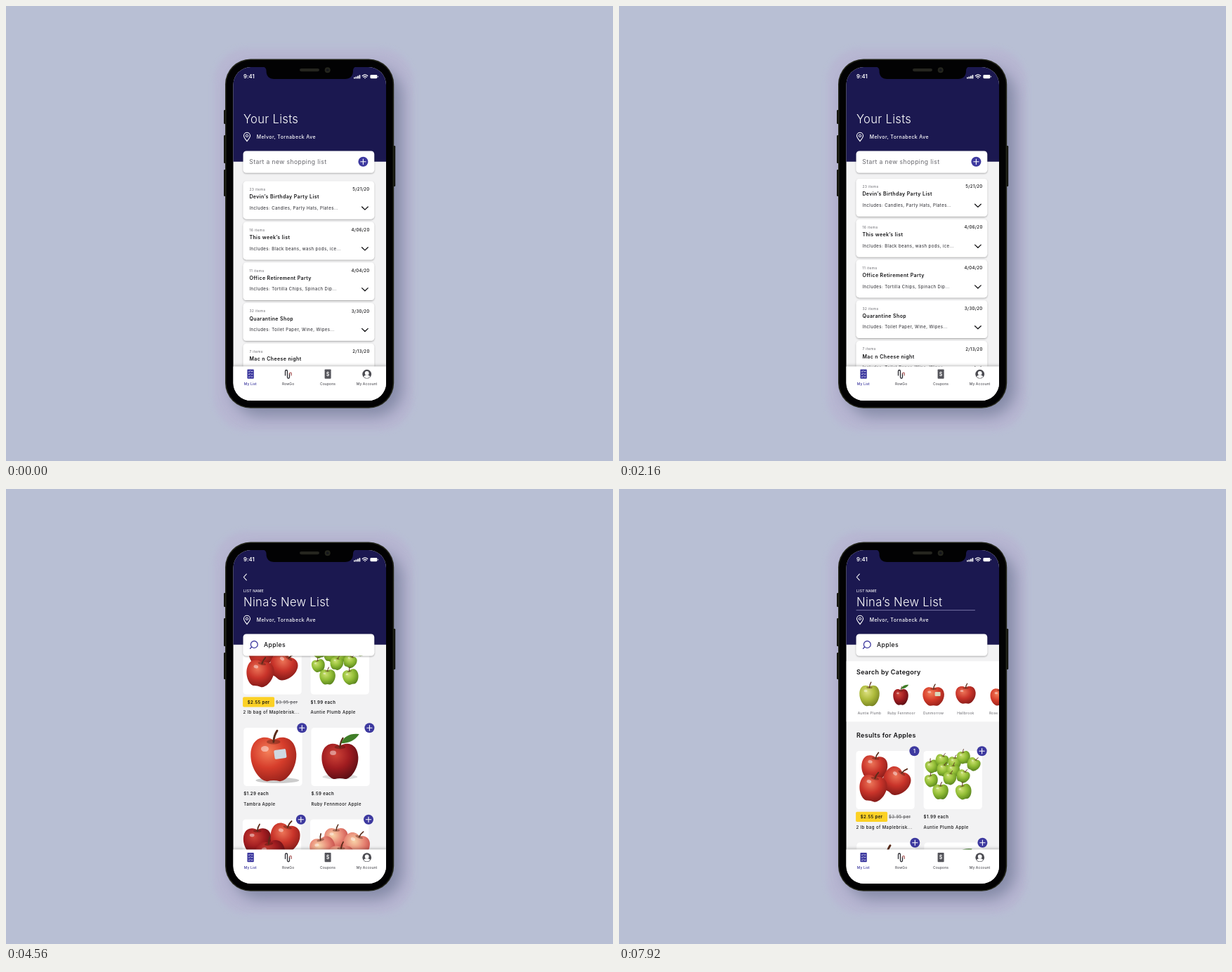
Recreate the animation shown at these times as an HTML page. Size 864 by 648 pixels, loop 8 s.

```html
<!DOCTYPE html>
<html lang="en">
<head>
<meta charset="utf-8">
<title>Shopping list app</title>
<style>
html, body { margin: 0; width: 100%; height: 100%; overflow: hidden; background: #b8bfd4; }
svg { display: block; width: 100vw; height: 100vh; }
text { font-family: Inter, Roboto, sans-serif; white-space: pre; }
</style>
</head>
<body>
<svg id="stage" viewBox="0 0 864 648" xmlns="http://www.w3.org/2000/svg"></svg>
<script>
const NAVY = '#1b1850', BLUE = '#3d399f', INK = '#121214', GREY = '#66666c', YELLOW = '#fcd125';
const LOOP = 8000, STEP = 80;

// ---------- drawing helpers ----------
const text = (x, y, s, size, o = {}) =>
  `<text x="${x}" y="${y}" font-size="${size}" font-weight="${o.w || 400}" fill="${o.c || INK}" ` +
  `letter-spacing="${o.ls ?? 0.4}" text-anchor="${o.a || 'start'}" ${o.x || ''}>${s}</text>`;
const rect = (x, y, w, h, r, fill, x2 = '') =>
  `<rect x="${x}" y="${y}" width="${w}" height="${h}" rx="${r}" fill="${fill}" ${x2}/>`;
const line = (d, c, w, x = '') =>
  `<path d="${d}" fill="none" stroke="${c}" stroke-width="${w}" stroke-linecap="round" stroke-linejoin="round" ${x}/>`;
const shape = (d, fill, x = '') => `<path d="${d}" fill="${fill}" ${x}/>`;
const disc = (x, y, r, fill, x2 = '') => `<circle cx="${x}" cy="${y}" r="${r}" fill="${fill}" ${x2}/>`;
const at = (x, y, s) => `<g transform="translate(${x} ${y})">${s}</g>`;
const group = (id, s, x = '') => `<g id="${id}" ${x}>${s}</g>`;

const plus = (x, y, r = 7) => disc(x, y, r, BLUE) +
  line(`M${x - r * .52} ${y}h${r * 1.04}M${x} ${y - r * .52}v${r * 1.04}`, '#fff', 1.1);

const APPLE = 'M0-.78C.25-1 .95-1.02 1-.2C1.02.45 .55 1 .27.97Q0 .9-.27.97C-.55 1-1.02.45-1-.2C-.95-1.02-.25-1 0-.78Z';
function apple(x, y, r, tone, o = {}) {
  const k = o.k || 1;
  return `<g transform="translate(${x} ${y}) rotate(${o.turn || 0}) scale(${r} ${r * k})">` +
    shape(APPLE, `url(#${tone})`) +
    '<ellipse cx="0" cy="-.72" rx=".3" ry=".1" fill="#3a1008" opacity=".35"/>' +
    line('M0-.72Q.02-1 .16-1.2', '#5a2c1a', .09) +
    (o.leaf ? shape('M.05-.92Q.3-1.5 1.05-1.42Q.75-.95.05-.92Z', '#3f7d27') : '') +
    '<ellipse cx="-.38" cy="-.42" rx=".17" ry=".12" fill="#fff" opacity=".45"/></g>';
}
const trio = tone => apple(26, 24, 18.5, tone, { turn: 8 }) + apple(57, 43, 19.5, tone, { turn: 35 }) +
  apple(24, 53, 19.5, tone, { turn: 12 });

const gradient = (id, a, b, c) => `<radialGradient id="${id}" cx=".38" cy=".32" r=".75">` +
  `<stop offset="0" stop-color="${a}"/><stop offset=".5" stop-color="${b}"/><stop offset="1" stop-color="${c}"/></radialGradient>`;
const blur = (id, s) => `<filter id="${id}" x="-30%" y="-30%" width="160%" height="160%"><feGaussianBlur stdDeviation="${s}"/></filter>`;

const defs = '<defs>' +
  gradient('red', '#ec7558', '#c9342a', '#811917') +
  gradient('scarlet', '#f4805a', '#d63d2b', '#95201a') +
  gradient('dark', '#cf4438', '#a01c20', '#560d13') +
  gradient('green', '#cbe070', '#91bd35', '#547f1b') +
  gradient('lime', '#dde080', '#aebb3c', '#737f20') +
  gradient('pink', '#f8d3a8', '#e78574', '#bd403f') +
  blur('soft', 10) + blur('halo', 4) +
  '<filter id="lift" x="-10%" y="-20%" width="120%" height="150%"><feDropShadow dx="0" dy="1" stdDeviation="1" flood-color="#000" flood-opacity=".35"/></filter>' +
  '<filter id="rise" x="-10%" y="-20%" width="120%" height="130%"><feDropShadow dx="0" dy="-1" stdDeviation="2.2" flood-color="#000" flood-opacity=".3"/></filter>' +
  '<clipPath id="screen"><rect x="323.5" y="87" width="217.5" height="475" rx="25"/></clipPath>' +
  '<clipPath id="body"><rect x="323.5" y="221.5" width="217.5" height="341"/></clipPath></defs>';

// ---------- phone ----------
function phoneBack() {
  const button = (x, y, h) => rect(x, y, 4, h, 1.2, '#15160f');
  return rect(296, 60, 284, 545, 48, '#b7b5d2', 'filter="url(#halo)" opacity=".8"') +
    rect(322, 88, 242, 496, 40, '#737b98', 'filter="url(#soft)" opacity=".75"') +
    button(310, 148, 20) + button(310, 184, 40) + button(310, 233, 38) + button(550.2, 199, 58) +
    rect(312, 75.5, 240.2, 497.3, 36, '#23251a') + rect(313.6, 77, 237, 494.3, 34.5, '#020203');
}
function phoneFront() {
  return shape('M366 86H498Q494 88 494 92Q494 104 482 104H382Q370.5 104 370.5 92Q370.5 88 366 86Z', '#020203') +
    rect(418, 89, 28, 4.2, 2.1, '#25251f') + disc(457.7, 91.2, 4, '#24251d') + disc(457.7, 91.2, 1.8, '#15161c');
}
function statusBar() {
  const bars = [0, 1, 2, 3].map(i => rect(495 + i * 2.5, 101.6 - i * 1.1, 1.8, 1.8 + i * 1.1, .4, '#fff')).join('');
  return text(338, 103.4, '9:41', 7.7, { w: 600, c: '#fff', ls: .1 }) + bars +
    line('M507.3 99.5Q511 96.3 514.7 99.5M508.9 101.3Q511 99.6 513.1 101.3', '#fff', 1.2) + disc(511, 102.8, .8, '#fff') +
    rect(518.4, 98, 10, 5.2, 1.4, '#fff') + rect(529.2, 99.7, .9, 1.8, .4, '#fff');
}

// ---------- shared header and navigation ----------
const title = (id, s, c) => text(338, 166.8, s, 16.6, { w: 300, c, ls: .3, x: `id="${id}"` });
function header() {
  return rect(323, 86, 219, 135.7, 0, NAVY) + statusBar() + title('title', '', '#fff') +
    group('edit', line('M342.3 121.2L338.3 125.5L342.3 129.8', '#fff', 1.1) +
      text(338, 147.4, 'LIST NAME', 4.9, { w: 500, c: '#fff', ls: .3 })) +
    line('M338 172.6H506.5', '#8c8ab8', .8, 'id="underline"') +
    shape('M343 192.6C340.5 189.3 338.5 187.3 338.5 184.8A4.5 4.5 0 0 1 347.5 184.8C347.5 187.3 345.5 189.3 343 192.6Z', 'none', 'stroke="#fff" stroke-width="1.1"') +
    disc(343, 184.8, 1.7, 'none', 'stroke="#fff" stroke-width="1"') +
    text(356.7, 189.3, 'Melvor, Tornabeck Ave', 6.9, { w: 500, c: '#fff', ls: .42 }) +
    rect(337.6, 206.5, 186.6, 31, 4.5, '#fff', 'filter="url(#lift)"') +
    group('startRow', text(346.3, 225.3, 'Start a new shopping list', 8.6, { c: GREY }) + plus(508.4, 221.8)) +
    group('searchRow', disc(353.3, 221.4, 4.9, 'none', `stroke="${BLUE}" stroke-width="1.3"`) +
      line('M349.7 225L347.5 227.3', BLUE, 1.3) + text(367, 225.3, '', 8.6, { x: 'id="query"' }));
}
function navBar() {
  const label = (x, s, c) => text(x, 540, s, 5, { a: 'middle', c, ls: .08, w: 450 });
  const checks = [520.5, 524.2, 528].map(y => line(`M345.2 ${y}l.8.8 1.5-1.7M349 ${y}h2`, '#fff', .7)).join('');
  return rect(323, 513.5, 219, 50, 0, '#fff', 'filter="url(#rise)"') + group('tabs',
    rect(343.4, 517.5, 9.4, 13.2, 1, BLUE) + checks +
    line('M397.5 526V520.3Q397.5 518.5 399 518.5T400.5 520.3V528.5Q400.5 530.3 402 530.3T403.5 528.5V523.5', '#2b2b31', 1.3) +
    line('M403.5 524Q403.5 522 405 522T406.2 523.8V526', '#a34a4a', 1.1) +
    rect(453.6, 517.5, 9, 13.2, .8, '#55555b') + text(458.1, 526.6, '$', 7, { a: 'middle', c: '#fff', w: 600, ls: 0 }) +
    disc(513.7, 524.2, 6.4, '#4b4b51') + disc(513.7, 522.9, 2.9, '#fff') +
    shape('M509 528.1Q510 526 512 525.8H515.4Q517.4 526 518.4 528.1Q513.7 532 509 528.1Z', '#fff') +
    label(347.8, 'My List', BLUE) + label(401.6, 'RowGo', '#55555b') + label(458, 'Coupons', '#55555b') + label(513.6, 'My Account', '#55555b'));
}

// ---------- saved lists ----------
const LISTS = [
  [23, 'Devin’s Birthday Party List', '5/21/20', 'Candles, Party Hats, Plates'],
  [16, 'This week’s list', '4/06/20', 'Black beans, wash pods, ice'],
  [11, 'Office Retirement Party', '4/04/20', 'Tortilla Chips, Spinach Dip'],
  [32, 'Quarantine Shop', '3/30/20', 'Toilet Paper, Wine, Wipes'],
  [7, 'Mac n Cheese night', '2/13/20', 'Toilet Paper, Wine, Wipes'],
  [32, 'After Work Shop', '3/30/20', 'Milk, Bread, Bright Q Fla'],
  [22, 'This week’s List', '3/14/20', 'Milk, Eggs, Bananas'],
];
const listCard = ([n, name, date, items], i) => at(337.6, 249.6 + i * 57.8,
  rect(0, 0, 186.6, 53.8, 4.5, '#fff', 'filter="url(#lift)"') +
  text(8.8, 13.4, n + ' items', 5, { c: GREY, ls: .35 }) + text(180, 13.6, date, 6, { w: 500, a: 'end', ls: .35 }) +
  text(8.8, 24.6, name, 7, { w: 600 }) + text(8.8, 40.2, `Includes: ${items}...`, 6, { ls: .44, c: '#222228' }) +
  line('M169 36.4L173.3 40.5L177.6 36.4', INK, 1.3));

// ---------- product tiles ----------
const sale = (x, y, now, old) => rect(x, y, 45, 14.4, 1.8, YELLOW) +
  text(x + 22.5, y + 9.4, now, 6, { w: 600, a: 'middle' }) +
  (old ? text(x + 47, y + 9.4, old, 6, { c: '#4c4c50', x: 'text-decoration="line-through"' }) : '');
const tile = (x, y, art, price, name, badge) => at(x, y, rect(0, 0, 83.3, 83, 4.5, '#fff') + art +
  (price[1] ? sale(-.3, 86.7, ...price) : text(0, 96.2, price[0], 6, { w: 600 })) +
  text(0, 110.6, name, 6, { w: 500, ls: .43 }) + (badge || plus(83, .3)));

function burgerBox() {
  return shape('M0 22L83 14L82.5 59L1.5 67Z', '#b3271f') + shape('M0 22L83 14V18.5L0 26.5Z', '#6fa03c') +
    shape('M73 17L82 16V36L73 37Z', '#7fae42') +
    text(45, 29, 'THE ORIGINAL', 4.8, { a: 'middle', c: '#f3c75a', w: 600, x: 'transform="rotate(-4 45 29)"' }) +
    shape('M15 33L73 28.5V43L15 47.5Z', '#fff') +
    shape('M28 53Q31 43 47 43T64 51Z', '#d58a3c') + line('M28 54Q46 50 65 53', '#72a53a', 2.5) +
    line('M29 57Q46 54 64 56', '#6d331b', 3) + shape('M29 59H64Q62 62.5 50 63T29 59Z', '#dca253') +
    line('M6 58L22 56.5', '#e3b45c', 2);
}
function cheeseBag() {
  return shape('M23 13Q41 10 60 13L59 70Q41 73 24 70Z', '#a8242c') + shape('M27 35H56L57 57H26Z', '#ecd9bd') +
    [0, 1, 2, 3, 4, 5].map(i => line(`M${28 + i * 4.7} ${40 + i % 3 * 4}l4 5`, '#c9ab84', 1)).join('') +
    shape('M24 56Q41 52 59 56L59 70Q41 73 24 70Z', '#26294f') + disc(41.5, 24, 5, '#bb2630') +
    rect(29, 31, 25, 4, 1, '#f1e6df') + rect(31, 45, 21, 4, 1, '#c43a33') + line('M29 62H54M33 66H50', '#c3c6dc', .7);
}
function teaBottle() {
  return shape('M34 9H51V16Q57 24 57 32V78Q57 81 53 81H32Q28 81 28 78V32Q28 24 34 16Z', '#c87b27') +
    shape('M32 27Q35 18 37 17V78H32Z', '#e6a650', 'opacity=".7"') + rect(33.5, 4, 18, 8, 1.5, '#e5e5e5') +
    rect(28, 32, 29, 39, .5, '#f4f2ed') + text(42.5, 43, 'KOMBUCHA', 4.8, { a: 'middle', w: 700, c: '#303b7c', ls: 0 }) +
    rect(33, 47, 19, 11, 1, '#3e3d92') + disc(42.5, 35.5, 2.2, '#d9a94b') + line('M32 63H53M35 66H50', '#8d8fa5', .7);
}
function juiceJug() {
  return shape('M26 7H46Q48 15 57 20Q68 25 69 39V75Q69 82 62 82H27Q20 82 20 76V34Q20 23 25 16Z', '#9c2a14') +
    shape('M22 36Q26 21 30 17L31 79H25Q22 79 22 74Z', '#c44a22', 'opacity=".7"') +
    line('M54 25Q63 29 62 40V49Q57 49 56 43Z', '#dcc2b8', 2.5) + rect(25, 1, 20, 7, 1.5, '#241a1c') +
    rect(34, 50, 34, 26, 1, '#cb3b20') + rect(38, 53, 17, 12, 1, '#f2d5a3') +
    line('M38 69H63M38 72.5H57', '#f0a24c', 1.4);
}
const common = text(338, 260.4, 'Commonly Added Items', 9, { w: 600, ls: .3 }) +
  tile(337.4, 279, burgerBox(), ['$2.99 each'], 'Fenn Burgers') +
  tile(433.6, 279, cheeseBag(), ['$2.55 each', '$3.95 each'], 'Nut Cheese Mozzarell...') +
  tile(338.3, 409.4, teaBottle(), ['$3.99 each'], 'Ginger Tea') +
  tile(434.4, 409.4, juiceJug(), ['$8.99 each'], 'Hot Sauce');

// ---------- search results ----------
const GREENS = [[12, 22], [26, 14], [44, 17], [57, 9], [71, 19], [28, 27], [42, 28], [11, 42], [56, 36], [37, 39], [24, 58], [57, 58]];
const greenPile = GREENS.map(([x, y], i) => apple(x, y, i > 9 ? 11.3 : 9.4, 'green', { turn: i * 37 % 50 - 20 })).join('');
const CATEGORIES = [
  [356.5, 'Auntie Plumb', apple(0, 0, 14.3, 'lime', { k: 1.1 })],
  [402, 'Ruby Fennmoor', apple(-1, 2, 10.8, 'dark', { k: 1.12, leaf: 1 })],
  [447.6, 'Dunmorrow', apple(0, 1, 15.3, 'scarlet', { k: .92 }) + rect(2, -5, 8, 6, 1, '#d9d8bc')],
  [493.4, 'Hallbrook', apple(0, -1, 14.3, 'red', { k: .92 })],
  [541, 'Rose Dawn', apple(1, 2, 13.5, 'scarlet', { k: .95 })],
];
const firstBadge = group('addOne', plus(83, .3)) +
  group('added', disc(83, .3, 7, BLUE) + text(83, 3.3, '1', 8, { a: 'middle', c: '#fff', w: 500, ls: 0 }));
const bigApple = '<ellipse cx="48" cy="75" rx="31" ry="4" fill="#ccc"/>' + apple(42.5, 44, 32.5, 'scarlet', { k: 1.02 }) +
  rect(43.5, 31, 17, 13, 2, '#cfd8e2', 'transform="rotate(-8 52 37)"');
const leafApple = '<ellipse cx="41" cy="70" rx="25" ry="3.5" fill="#ddd"/>' + apple(41, 47, 26, 'dark', { k: 1.03, leaf: 1 });
const redPile = apple(21, 31, 20, 'dark') + apple(60, 26, 21, 'red', { turn: 15 }) + apple(40, 50, 21, 'dark', { turn: -10 });
const pinkPile = apple(37, 28, 17, 'pink') + apple(65, 38, 19, 'pink', { turn: 20 }) + apple(18, 42, 18, 'pink', { turn: -15 }) + apple(44, 55, 19, 'pink');
const results = rect(323, 245.3, 219, 86, 0, '#fff') +
  text(338, 264.4, 'Search by Category', 9, { w: 600, ls: .3 }) +
  CATEGORIES.map(([x, s, art]) => at(x, 294, art) + text(x, 321, s, 4.9, { a: 'middle', c: GREY, ls: .25 })).join('') +
  text(338, 354.4, 'Results for Apples', 9, { w: 600, ls: .3 }) +
  tile(337.4, 373, trio('red'), ['$2.55 per', '$3.95 per'], '2 lb bag of Maplebrisk...', firstBadge) +
  tile(433.6, 373, greenPile, ['$1.99 each'], 'Auntie Plumb Apple') +
  tile(338.3, 503.5, bigApple, ['$1.29 each'], 'Tambra Apple') +
  tile(434.4, 503.5, leafApple, ['$.59 each'], 'Ruby Fennmoor Apple') +
  tile(336.8, 634, redPile, ['$1.49 each'], 'Red Apple') +
  tile(433, 634, pinkPile, ['$1.79 each'], 'Pink Apple');

// ---------- quantity sheet ----------
const sheet = rect(323.5, 418, 217.5, 190, 13, '#fff', 'filter="url(#rise)"') +
  line('M396.3 428.4H465.5', '#0d0d10', 2.6) +
  `<g transform="translate(345 437) scale(.62)">${trio('red')}</g>` +
  text(409.6, 445.7, '2 lb bag Maplebrisk', 9, { w: 600, ls: .3 }) + text(409.6, 458, 'Apples', 9, { w: 600, ls: .3 }) +
  sale(409.7, 466.6, '$2.55 ea') + text(459, 475.6, 'Aisle 2', 6, { w: 500 }) +
  rect(341, 496.5, 89.8, 24.8, 1.5, '#fff', `stroke="${BLUE}" stroke-width="1.3"`) +
  disc(353.3, 508.8, 8.6, BLUE) + line('M348.8 508.8H357.8', '#fff', 1.2) + plus(418.2, 508.8, 8.6) +
  text(385.6, 513.6, '0', 13, { a: 'middle', c: '#2c2960', ls: 0, x: 'id="count"' }) +
  rect(443.6, 496, 73.6, 25.5, 2, BLUE) + text(480.3, 512, 'Done', 9.4, { a: 'middle', c: '#fff', w: 500, ls: .3 });

const stage = document.getElementById('stage');
stage.innerHTML = defs + rect(0, 0, 864, 648, 0, '#b8bfd4') + phoneBack() +
  '<g clip-path="url(#screen)">' + rect(323, 86, 219, 477, 0, '#f2f2f3') +
  '<g clip-path="url(#body)">' + group('lists', LISTS.map(listCard).join('')) + group('common', common) + group('results', results) + '</g>' +
  header() + navBar() + group('sheet', sheet) + '</g>' + phoneFront();

// ---------- motion ----------
const el = id => document.getElementById(id);
const ramp = (t, a, b) => Math.min(1, Math.max(0, (t - a) / (b - a)));
const ease = (t, a, b) => { const p = ramp(t, a, b); return p * p * (3 - 2 * p); };
const show = (id, v) => el(id).setAttribute('opacity', Number(v));
const shift = (id, y) => el(id).setAttribute('transform', `translate(0 ${y})`);
const write = (id, s, c) => { el(id).textContent = s; el(id).setAttribute('fill', c); };
const typed = (s, t, a, b) => s.slice(0, Math.round(s.length * ramp(t, a, b)));

function draw(t) {
  const open = ease(t, 2480, 2720), editing = open > .5;
  const found = t >= 4240, picked = t >= 5520;

  shift('lists', -108 * (ease(t, 80, 1280) - ease(t, 1520, 2240)));
  show('lists', 1 - open);
  show('common', found ? 0 : open);
  show('results', found);
  shift('results', (picked ? 0 : 1) - 164.5 * (ease(t, 4240, 4560) - ease(t, 4640, 5200)));

  const name = typed('Nina’s New List', t, 3520, 3920);
  if (!editing) write('title', 'Your Lists', '#fff');
  else write('title', name || 'Your List Name', name ? '#fff' : '#918fae');
  show('edit', open);
  show('underline', editing && (!found || picked));
  show('startRow', 1 - open);
  show('searchRow', open);
  const query = typed('Apples', t, 3960, 4200);
  write('query', query || 'Search for an item', query ? INK : GREY);
  el('query').setAttribute('font-weight', query ? 500 : 400);
  shift('tabs', editing ? .5 : 0);

  shift('sheet', 152 * (1 - ease(t, 5600, 6000) + ease(t, 7200, 7520)));
  const chosen = t >= 6720;
  el('count').textContent = chosen ? '1' : '0';
  show('addOne', !chosen);
  show('added', chosen);
}
const start = performance.now();
function frame() {
  const t = (performance.now() - start) % LOOP;
  draw(Math.floor(t / STEP) * STEP);
  requestAnimationFrame(frame);
}
frame();
</script>
</body>
</html>
```
